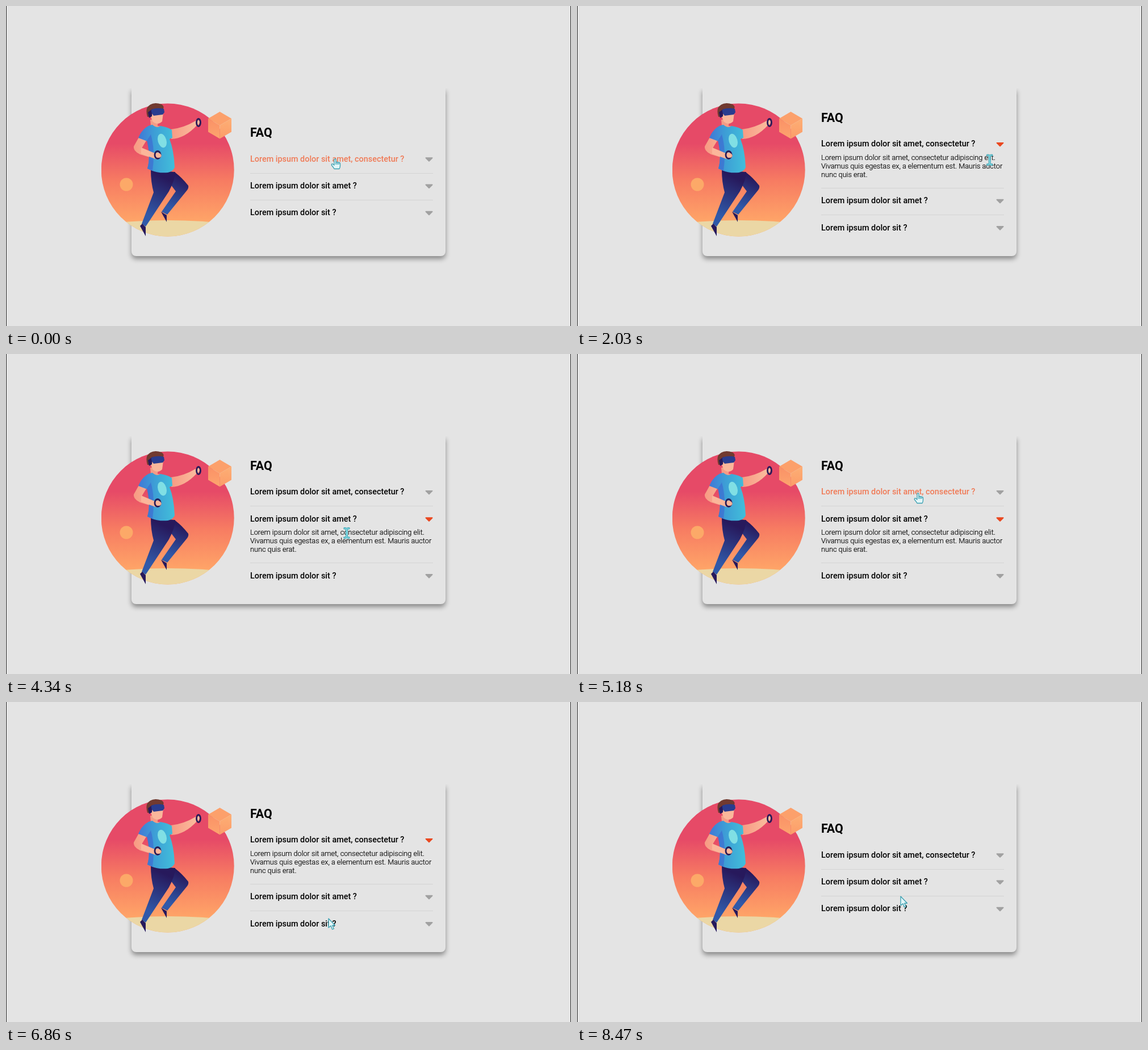
An HTML page that plays this animation: 995 by 563 pixels, repeating every 8540 ms.

```html
<!DOCTYPE html>
<html lang="en">
<head>
<meta charset="utf-8">
<title>FAQ accordion</title>
<style>
  html, body { margin: 0; width: 100%; height: 100%; overflow: hidden; background: #e4e4e4; }
  .stage { position: relative; width: 995px; height: 563px; overflow: hidden; }
  .card {
    position: absolute; left: 221px; top: 145px; width: 553px; height: 295px;
    border-radius: 0 0 8px 8px; background: #e4e4e4;
    box-shadow: 0 5px 8px rgba(0, 0, 0, .4); clip-path: inset(0 -20px -20px);
  }
  .edge { position: absolute; top: 0; width: 1px; height: 100%; background: #2b2b2b; }
  svg { position: absolute; left: 0; top: 0; }
  text { font-family: Roboto, sans-serif; fill: #000; }
  .title { font-size: 21.4px; font-weight: 700; }
  .question { font-size: 14.4px; font-weight: 500; }
  .hover .question { fill: #f07a56; }
  .answer { font-size: 12.7px; font-weight: 300; stroke: #000; stroke-width: .2; display: none; }
  .caret { fill: #a1a1a1; stroke: #a1a1a1; stroke-width: 2; stroke-linejoin: round; }
  .open .answer { display: block; }
  .open .caret { fill: #ea4820; stroke: #ea4820; }
  .rule { fill: #d3d3d3; }
  .skin { fill: url(#skin); }
  .navy { fill: #27195c; }
  .grip { fill: none; stroke: #281c59; stroke-width: 2.8; }
  #cursor path { fill: #e3f6f8; stroke: #399fb1; stroke-width: 1.3; stroke-linejoin: round; display: none; }
  #cursor .beam { fill: #86dde5; stroke-width: 1; }
  #ring { fill: none; stroke: #333; stroke-width: 1.5; }
</style>
</head>
<body>
<div class="stage">
  <div class="card"></div>
  <svg width="995" height="563" viewBox="0 0 995 563">
    <defs>
      <linearGradient id="sky" x2="0" y2="1">
        <stop offset=".3" stop-color="#e64a67"/>
        <stop offset=".58" stop-color="#f77c62"/>
        <stop offset=".9" stop-color="#ffa768"/>
      </linearGradient>
      <linearGradient id="cubeLeft" x2="0" y2="1">
        <stop stop-color="#fa9166"/><stop offset="1" stop-color="#fda46e"/>
      </linearGradient>
      <linearGradient id="cubeRight" x2="0" y2="1">
        <stop stop-color="#fdaf75"/><stop offset="1" stop-color="#fc9c69"/>
      </linearGradient>
      <linearGradient id="shirt">
        <stop stop-color="#4078d6"/><stop offset=".45" stop-color="#3d9fd6"/><stop offset="1" stop-color="#42bfda"/>
      </linearGradient>
      <linearGradient id="leg" x1=".6" x2=".3" y2="1">
        <stop offset=".1" stop-color="#27195c"/><stop offset=".85" stop-color="#3059a9"/>
      </linearGradient>
      <linearGradient id="skin">
        <stop stop-color="#f79a83"/><stop offset="1" stop-color="#fbc0a0"/>
      </linearGradient>
      <clipPath id="disc"><circle cx="284.700" cy="288.400" r="117"/></clipPath>
    </defs>

    <g id="art">
      <g clip-path="url(#disc)">
        <rect x="168" y="171" width="234" height="236" fill="url(#sky)"/>
        <path d="M168 384Q284 370 402 384V410H168Z" fill="#ebd7a5"/>
      </g>
      <circle cx="212" cy="314" r="11.500" fill="#fca968"/>

      <path d="M376.500 186l20.500 12-20.500 12-20.500-12Z" fill="#fca06b"/>
      <path d="M356 198l20.500 12v23.500l-20.500-12Z" fill="url(#cubeLeft)"/>
      <path d="M397 198l-20.500 12v23.500l20.500-12Z" fill="url(#cubeRight)"/>

      <path d="M275 290L298 293Q310 302 321 316 322 320 319 324L284 367 274 362 299 326 286 309Z" fill="url(#leg)"/>
      <path d="M255 289L298 292Q298 305 287 326L246 388 239 383 260 328Q255 310 255 289Z" fill="url(#leg)"/>
      <path class="navy" d="M273 362L283 368V380Z"/>
      <path class="navy" d="M236 387L240 383 246 389V405Z"/>

      <path class="skin" d="M290 217Q312 215 334 202 339 199 341 203 341 209 336 210 315 233 291 234Z"/>
      <path class="skin" d="M234 231L247 237 239 250 262 260Q271 255 274 263 272 271 263 269L236 261Q224 255 225 247Z"/>
      <path d="M254 200H268L267 211 274 212 264 218 255 211Z" fill="#f49c86"/>
      <path d="M246 214Q252 209 258 209 266 216 272 211 285 213 292 218L293 232 288 234Q296 255 297 284 294 291 285 293 266 295 249 286 255 266 249 238L233 232Q238 220 246 214Z" fill="url(#shirt)"/>
      <path d="M248 237L255 226Q263 253 258 290L249 286Q255 266 248 237Z" fill="#3d70d0" opacity=".75"/>
      <ellipse cx="275" cy="237" rx="7.500" ry="12.500" transform="rotate(-16 275 237)" fill="#80dfe4"/>
      <path d="M238 249L262 259Q271 255 274 263 272 271 263 269L238 260Z" fill="#fbb69a"/>
      <ellipse class="grip" cx="267" cy="262" rx="5" ry="6.500"/>
      <circle cx="269" cy="263" r="4" fill="#fbb69a"/>
      <ellipse class="grip" cx="339" cy="205" rx="3.500" ry="6.500"/>

      <path d="M252 186Q262 180 277 188L275 203Q267 211 258 203Z" fill="#fab79b"/>
      <path d="M249 195Q245 181 251 176 259 168 274 173 280 177 276 182L257 184 256 195Z" fill="#713a30"/>
      <path class="navy" d="M250 187L258 181 257 194 252 197Z"/>
      <path d="M256 182Q267 178 278 181L279 187 276 191 260 193Q255 188 256 182Z" fill="#293c8f"/>
    </g>

    <g id="faq">
      <text class="title" x="430" y="230">FAQ</text>
    </g>
    <circle id="ring" r="34"/>
    <g id="cursor">
      <path d="M0 0V16L4 12.700 6.600 19 9.400 18 6.700 12H11.500Z"/>
      <path d="M-2 9V1.500Q-2 0-.5 0T1 1.500V6Q2 5 3.500 6 4.500 5 6 6.400 8.500 6 8.500 8.500V12Q8.500 15 7 17.500H-2Q-4 14-6.700 11-7 8-4.500 9L-2 11ZM1 6v4M3.500 6v4M6 7v3"/>
      <path class="beam" d="M-5-9.500h3l2 1 2-1h3V-7H1.500V7H5v2.500H2l-2-1-2 1h-3V7h3.500V-7H-5Z"/>
    </g>
  </svg>
  <div class="edge" style="left:0"></div>
  <div class="edge" style="right:0"></div>
</div>
<script>
  const LOOP = 8540, STEP = 70;
  const FIRST = 268.7, GAP = 47.3, EXTRA = 52.6, HIT = 8.5;
  const questions = [
    'Lorem ipsum dolor sit amet, consectetur ?',
    'Lorem ipsum dolor sit amet ?',
    'Lorem ipsum dolor sit ?'
  ];
  const answer = [
    'Lorem ipsum dolor sit amet, consectetur adipiscing elit.',
    'Vivamus quis egestas ex, a elementum est. Mauris auctor',
    'nunc quis erat.'
  ];

  // Pointer travel: each move eases out from wherever the last one ended
  const home = [580, 269];
  const moves = [
    { from: 0, to: 630, at: [749, 277] },
    { from: 630, to: 980, at: [747, 270] },
    { from: 1400, to: 1680, at: [745, 279] },
    { from: 1920, to: 2800, at: [667, 244] },
    { from: 3500, to: 4130, at: [600, 315] },
    { from: 4480, to: 5320, at: [601, 243] },
    { from: 5810, to: 6020, at: [598, 298] },
    { from: 6020, to: 6790, at: [568, 381] },
    { from: 6860, to: 7000, at: [570, 387] },
    { from: 7560, to: 7980, at: [570, 342] }
  ];

  // Each click toggles its row on release
  const clicks = [
    { down: 1120, up: 1470, row: 0 },
    { down: 3150, up: 3430, row: 0 },
    { down: 4130, up: 4340, row: 1 },
    { down: 5460, up: 5600, row: 0 },
    { down: 7140, up: 7280, row: 2 },
    { down: 8120, up: 8470, row: 2 }
  ];

  const $ = s => document.querySelector(s);
  const faq = $('#faq'), title = $('.title'), cursor = $('#cursor'), ring = $('#ring');
  const easeOut = k => k * (2 - k);
  const shift = (el, x, y) => el.setAttribute('transform', `translate(${x} ${y})`);

  function add(parent, tag, attrs, text = '') {
    const el = document.createElementNS('http://www.w3.org/2000/svg', tag);
    for (const k in attrs) el.setAttribute(k, attrs[k]);
    el.textContent = text;
    return parent.appendChild(el);
  }

  const rows = questions.map((q, i) => {
    const row = add(faq, 'g', {});
    add(row, 'text', { class: 'question', x: 430, y: 5 }, q);
    add(row, 'path', { class: 'caret', d: 'M739.5-1.5h11l-5.5 5.5Z' });
    answer.forEach((line, n) =>
      add(row, 'text', { class: 'answer', x: 430, y: 28.7 + 14.8 * n }, line));
    const rule = i < questions.length - 1 &&
      add(faq, 'rect', { class: 'rule', x: 430, width: 322, height: 1 });
    return { row, rule };
  });

  function pointer(t) {
    return moves.reduce((pos, { from, to, at }) => {
      const k = easeOut(Math.min(1, Math.max(0, (t - from) / (to - from))));
      return pos.map((v, i) => v + (at[i] - v) * k);
    }, home);
  }

  function openRow(t) {
    return clicks.reduce((open, { up, row }) =>
      t < up ? open : open === row ? -1 : row, -1);
  }

  function render(t) {
    const open = openRow(t);
    const [px, py] = pointer(t);
    const lift = open < 0 ? 0 : -EXTRA / 2;
    let shape = 0, y = FIRST + lift;

    shift(title, 0, lift);
    rows.forEach(({ row, rule }, i) => {
      const extra = i === open ? EXTRA : 0;
      const hover = Math.abs(py - y) < HIT;
      shift(row, 0, y);
      row.classList.toggle('open', i === open);
      row.classList.toggle('hover', hover);
      if (rule) rule.setAttribute('y', Math.round(y + 25 + extra));
      if (hover) shape = 1;
      else if (extra && py > y && py < y + EXTRA + HIT) shape = 2;
      y += GAP + extra;
    });

    shift(cursor, px, py);
    [...cursor.children].forEach((p, i) => p.style.display = i === shape ? 'block' : 'none');

    const click = clicks.find(c => t >= c.down && t < c.up);
    ring.style.opacity = click ? .4 * (click.up - t) / (click.up - click.down) : 0;
    shift(ring, px - 4, py);
  }

  const begin = performance.now();
  function tick() {
    const t = (performance.now() - begin) % LOOP;
    render(Math.floor(t / STEP) * STEP);
    requestAnimationFrame(tick);
  }
  tick();
</script>
</body>
</html>
```
